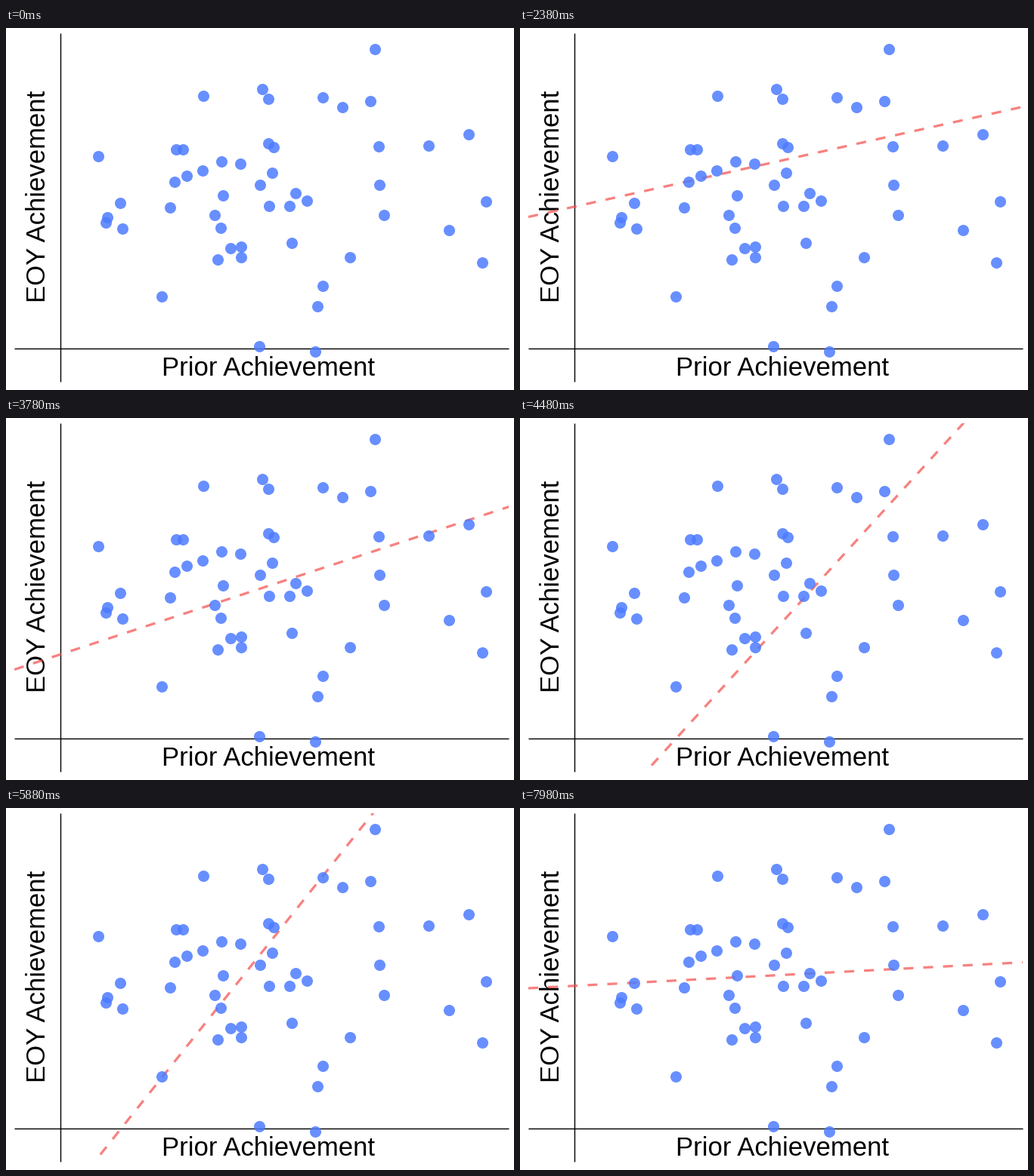
Animation, 672 px wide and 480 px high, one loop 8 s. Source, as a matplotlib script:

```python
import matplotlib.pyplot as plt
from matplotlib.animation import FuncAnimation
from matplotlib.patches import Rectangle

W, H, DPI = 672, 480, 100
LEFT, TOP, RIGHT, BOTTOM = 11, 7.33, 664.67, 469
STEP = 20                    # ms per frame
FIRST, HOLD = 980, 700       # ms before the first line, ms per line

POINTS = [
    (488, 28), (261, 89.5), (338.5, 81), (346.5, 93.5), (418.5, 91.5),
    (445, 104.5), (481.5, 97), (612, 141), (559, 155.5), (493, 156.5),
    (121.5, 169.5), (225, 161), (233.5, 160.5), (347, 153), (354, 157.5),
    (285, 177), (310, 179.5), (260, 188.5), (239, 196), (223, 203.5),
    (351.5, 191.5), (335.5, 208), (494, 208), (383, 218.5), (397.5, 228.5),
    (287, 222), (151, 231.5), (216.5, 238), (347.5, 236), (374.5, 236),
    (635, 230), (276, 247.5), (500, 247.5), (133.5, 251), (131.5, 258),
    (153.5, 265.5), (283.5, 265), (585.5, 267.5), (377.5, 284.5),
    (297, 291.5), (311, 290), (311, 303.5), (280, 307), (455, 303.5),
    (629.5, 310.5), (418.5, 342), (206, 356), (412, 368.5), (335, 421.5),
    (408.5, 429),
]

# x, y of a point on each line, and its upward slope
FITS = [
    (169.7, 459.2, 1.318), (104.2, 461.7, 0.980), (11, 250.5, 0.2232),
    (11, 477.2, 0.6225), (340, 225, 0.33), (174, 460.7, 1.10),
    (66.2, 463, 0.853), (124.8, 459.5, 1.255), (340, 220, 0.284),
    (127.8, 461, 1.058), (11, 239, 0.0525),
]


def px(n):
    return n * 72 / DPI


def ends(x, y, slope):
    """Line across the panel, begun at its left side or the stage bottom."""
    x0 = max(LEFT, x - (H - y) / slope)
    x1 = min(RIGHT + 1, x + y / slope)
    return [x0, x1], [y - slope * (v - x) for v in (x0, x1)]


plt.rcParams["font.family"] = "Liberation Sans"
fig = plt.figure(figsize=(W / DPI, H / DPI), dpi=DPI, facecolor="white")
ax = fig.add_axes([0, 0, 1, 1])
ax.set(xlim=(0, W), ylim=(H, 0))
ax.axis("off")

axis_style = dict(color="black", lw=px(1.42), solid_capstyle="butt", zorder=1)
ax.plot([LEFT, RIGHT], [425.4, 425.4], **axis_style)
ax.plot([71.7, 71.7], [TOP, BOTTOM], **axis_style)

label_style = dict(fontsize=25, color="black", ha="center", va="baseline",
                   rotation_mode="anchor", zorder=1)
ax.text(347.5, 461, "Prior Achievement", **label_style)
ax.text(52, 223, "EOY Achievement", rotation=90, **label_style)

fit, = ax.plot([], [], color="#f54c4a", alpha=0.7, lw=px(3.27),
               linestyle=(0, (4, 4)), dash_capstyle="butt", zorder=2)
fit.set_clip_path(Rectangle((LEFT, TOP), RIGHT - LEFT, BOTTOM - TOP,
                            transform=ax.transData))

ax.scatter(*zip(*POINTS), s=px(15) ** 2, color="#4d7cff", alpha=0.85,
           linewidths=0, zorder=3)


def draw(i):
    k = (i * STEP - FIRST) // HOLD
    fit.set_data(*(ends(*FITS[k]) if k >= 0 else ([], [])))
    return fit,


anim = FuncAnimation(fig, draw, frames=8000 // STEP, interval=STEP,
                     init_func=lambda: draw(0), repeat=True, repeat_delay=0)
plt.show()
```
